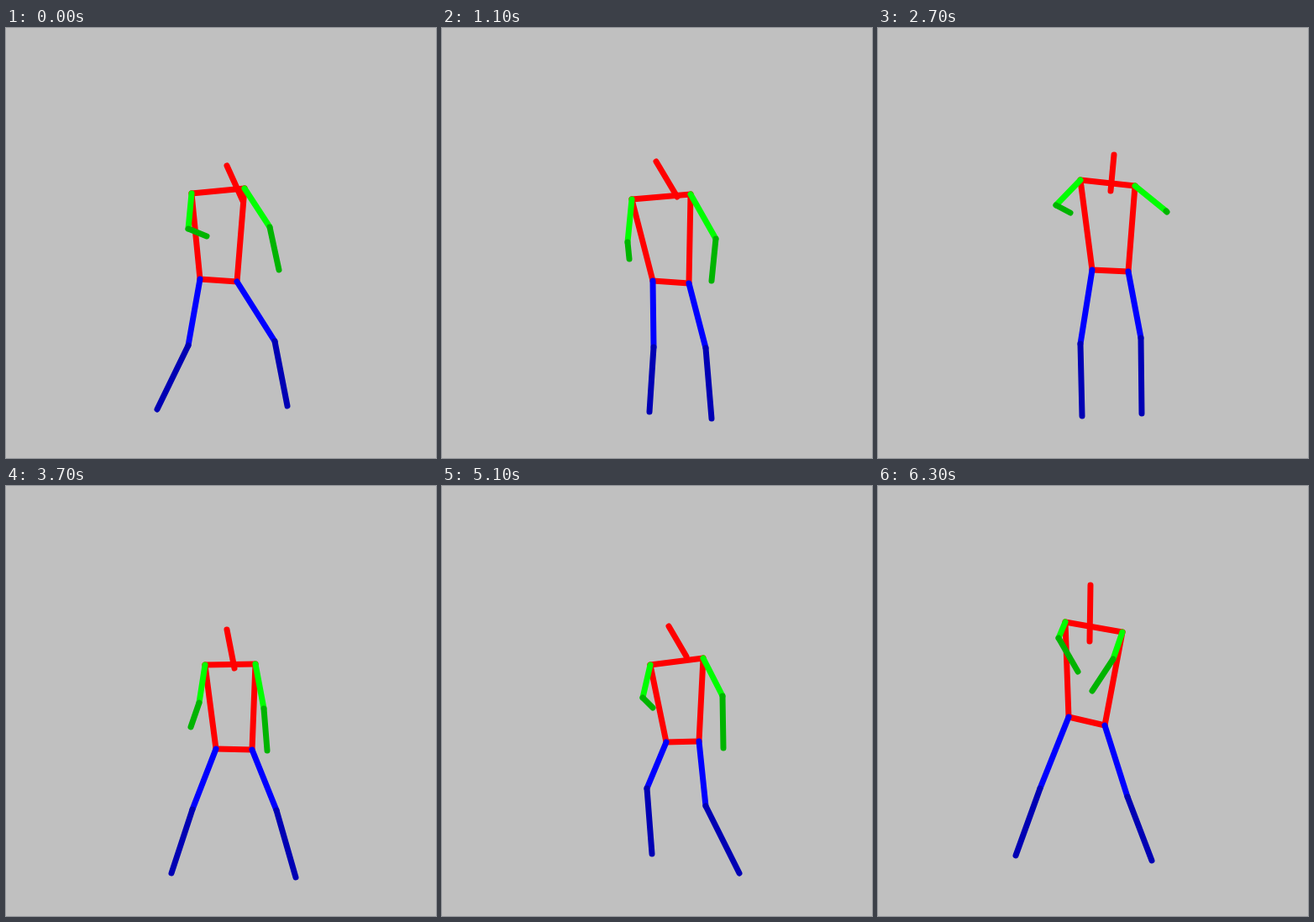
An HTML page with a canvas for the animation above (6400 ms loop, 512 px wide and 512 px high).

```html
<!DOCTYPE html>
<html lang="en">
<head>
<meta charset="utf-8">
<title>Moving stick figure</title>
<style>
  html, body { margin: 0; width: 100%; height: 100%; overflow: hidden; background: #c0c0c0; }
  canvas { display: block; width: 100vmin; height: 100vmin; }
</style>
</head>
<body>
<canvas id="stage" width="512" height="512"></canvas>
<script>
const ctx = document.getElementById("stage").getContext("2d");
const STEP = 100, STEPS = 64;
const BEATS = [0, 11, 20, 27, 37, 51, 63];

// Smooth curve through the values that never overshoots them.
function curve(times, values) {
  const last = times.length - 1;
  const rate = i => (values[i + 1] - values[i]) / (times[i + 1] - times[i]);
  const slope = i => {
    if (i === 0) return rate(0);
    if (i === last) return rate(last - 1);
    const a = rate(i - 1), b = rate(i);
    return a * b > 0 ? 2 * a * b / (a + b) : 0;
  };
  return t => {
    let i = 0;
    while (i < last - 1 && t >= times[i + 1]) i++;
    const span = times[i + 1] - times[i], u = (t - times[i]) / span, v = 1 - u;
    return v * v * (1 + 2 * u) * values[i] + u * u * (3 - 2 * u) * values[i + 1]
      + span * u * v * (v * slope(i) - u * slope(i + 1));
  };
}

function joint(xs, ys, times = BEATS) {
  const x = curve(times, xs), y = curve(times, ys);
  return t => [x(t), y(t)];
}

const head = joint([263, 255, 266, 281, 263, 270, 253], [164, 159, 181, 151, 171, 167, 118]);
const neck = joint([282, 280, 282, 277, 272, 291, 252], [206, 201, 209, 194, 217, 203, 185]);

const shoulderL = joint([221, 226, 244, 241, 237, 248, 223], [197, 204, 223, 181, 213, 213, 162]);
const elbowL = joint([217, 221, 243, 212, 230, 239, 215], [239, 255, 261, 211, 258, 252, 181]);
const handL = joint([239, 223, 246, 229, 220, 251, 238], [248, 275, 295, 220, 287, 264, 221]);

const shoulderR = joint([284, 296, 300, 306, 297, 311, 291], [191, 198, 208, 188, 212, 205, 174]);
const elbowR = joint([314, 326, 331, 343, 307, 334, 280], [237, 251, 259, 218, 265, 250, 206]);
const handR = joint([325, 321, 318, 344, 311, 335, 255], [288, 301, 299, 219, 315, 312, 244]);

const hipL = joint([231, 251, 275, 255, 250, 267, 227], [299, 301, 310, 288, 313, 305, 275]);
const kneeL = joint([217, 252, 247, 241, 222, 244, 193], [378, 380, 298, 376, 385, 360, 360]);
const footL = joint(
  [180, 247, 262, 243, 193, 197, 200, 233, 250, 236, 164],
  [454, 457, 353, 462, 464, 461, 460, 442, 438, 442, 440],
  [0, 11, 20, 27, 33, 37, 42, 49, 51, 56, 63]);

const hipR = joint([275, 294, 308, 298, 293, 306, 270], [302, 304, 309, 290, 314, 304, 285]);
const kneeR = joint([320, 314, 305, 313, 322, 314, 297], [373, 381, 397, 369, 386, 381, 370]);
const footR = joint(
  [335, 349, 321, 314, 314, 345, 361, 354, 326],
  [450, 469, 465, 485, 459, 466, 469, 461, 446],
  [0, 4, 11, 20, 27, 37, 45, 51, 63]);

const RED = "#f00", GREEN = "#0f0", DARK_GREEN = "#00b400", BLUE = "#00f", DARK_BLUE = "#0000b4";
const BONES = [
  [RED, head, neck],
  [RED, shoulderL, shoulderR],
  [RED, shoulderL, hipL],
  [RED, shoulderR, hipR],
  [RED, hipL, hipR],
  [GREEN, shoulderL, elbowL],
  [DARK_GREEN, elbowL, handL],
  [GREEN, shoulderR, elbowR],
  [DARK_GREEN, elbowR, handR],
  [BLUE, hipL, kneeL],
  [DARK_BLUE, kneeL, footL],
  [BLUE, hipR, kneeR],
  [DARK_BLUE, kneeR, footR],
];

function draw() {
  const t = Math.floor(performance.now() / STEP) % STEPS;
  ctx.fillStyle = "#c0c0c0";
  ctx.fillRect(0, 0, 512, 512);
  ctx.lineWidth = 7;
  ctx.lineCap = "round";
  for (const [color, from, to] of BONES) {
    ctx.strokeStyle = color;
    ctx.beginPath();
    ctx.moveTo(...from(t));
    ctx.lineTo(...to(t));
    ctx.stroke();
  }
  requestAnimationFrame(draw);
}
draw();
</script>
</body>
</html>
```
